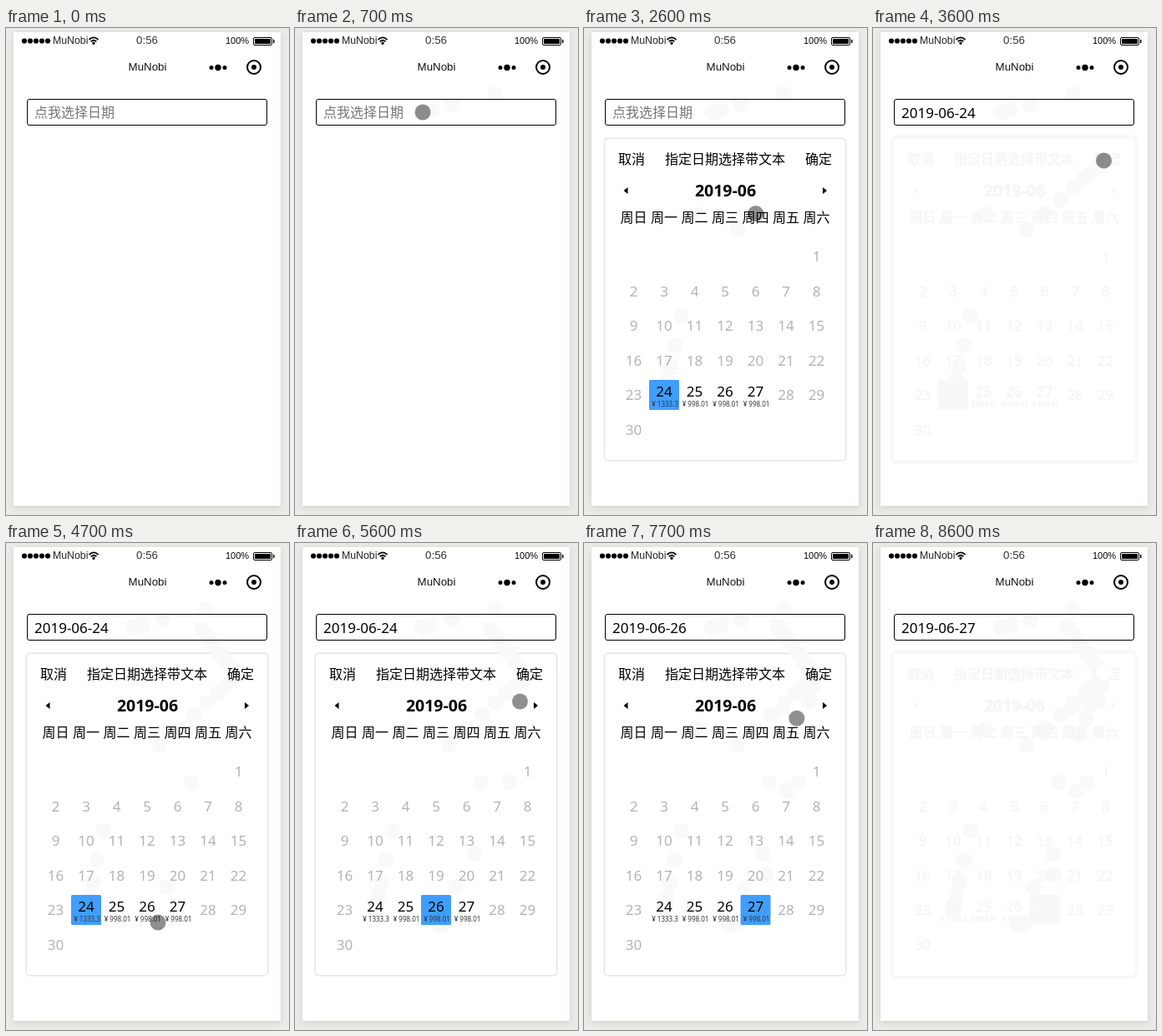
Recreate the animation shown at these times as an HTML page. Size 339 by 584 pixels, loop 9200 ms.

```html
<!DOCTYPE html>
<html lang="zh">
<head>
<meta charset="utf-8">
<title>Date picker</title>
<style>
html, body { margin: 0; width: 100%; height: 100%; overflow: hidden; background: #ecebe7; }
svg { display: block; width: 100vw; height: 100vh; }
text { font: 16px "Noto Sans CJK SC", "Noto Sans CJK", sans-serif; }
.sys { font-family: "Liberation Sans", Arial, sans-serif; }
.num { font-family: "Noto Sans", "Open Sans", sans-serif; font-size: 17px; }
.title { font-size: 19.5px; font-weight: 700; }
.price { font-size: 8px; fill: #333; }
.off { fill: #b3b3b3; }
.mid { text-anchor: middle; }
#frame { fill: #fff; stroke: #e2e2ea; filter: url(#glow); }
#cell { fill: #409eff; }
.faint #frame { stroke: #f8f8f8; stroke-width: 8; paint-order: stroke; filter: none; }
.faint #cell { fill: #f8f8f8; }
.faint text, .faint path { fill: #f6f6f6; stroke: #f6f6f6; stroke-width: .8; }
#trail { fill: #f9f9f9; }
</style>
</head>
<body>
<svg viewBox="0 0 339 584">
  <defs>
    <filter id="soft" x="-10%" y="-10%" width="120%" height="120%">
      <feDropShadow dx="0" dy="2" stdDeviation="4" flood-opacity=".12"/>
    </filter>
    <filter id="glow" x="-10%" y="-10%" width="120%" height="120%">
      <feDropShadow dx="0" dy="0" stdDeviation="1.2" flood-color="#88a" flood-opacity=".25"/>
    </filter>
  </defs>
  <rect width="339" height="584" fill="#ecebe7"/>
  <rect x="9" y="5" width="320" height="568" fill="#fff" filter="url(#soft)"/>

  <g id="dots"></g>
  <text class="sys" x="56" y="19" style="font-size:12.3px" fill="#222">MuNobi</text>
  <g fill="none" stroke="#000" stroke-width="1.8">
    <path d="M99.5 14Q105 8.8 110.5 14M101.7 16.3Q105 13.2 108.3 16.3"/>
    <circle cx="105" cy="18.3" r=".8"/>
  </g>
  <text class="sys mid" x="169" y="19" style="font-size:13.3px" fill="#333">0:56</text>
  <text class="sys" x="263" y="19" style="font-size:11px">100%</text>
  <rect x="296.5" y="11.5" width="22" height="9" rx="1.5" fill="none" stroke="#000"/>
  <rect x="298" y="13" width="19" height="6" rx=".5"/>
  <rect x="320" y="14" width="1.5" height="4"/>

  <text class="sys mid" x="169.5" y="51" style="font-size:13.3px" fill="#111">MuNobi</text>
  <circle cx="246" cy="47.5" r="2.5"/>
  <circle cx="254" cy="47.5" r="3.7"/>
  <circle cx="262" cy="47.5" r="2.5"/>
  <circle cx="297" cy="47" r="8" fill="none" stroke="#000" stroke-width="2"/>
  <circle cx="297" cy="47" r="3"/>

  <g id="panel">
    <rect id="frame" x="24.5" y="132.5" width="289" height="386" rx="4"/>
    <g id="trail"></g>
    <g id="sheet">
      <rect id="cell" y="422" width="36" height="36" rx="1.5"/>
      <text x="41" y="163">取消</text>
      <text x="97" y="163">指定日期选择带文本</text>
      <text x="265" y="163">确定</text>
      <text class="num title mid" x="169.5" y="201.5">2019-06</text>
      <path d="M47.500 195l5-4v8zM291 195l-5-4v8z"/>
    </g>
  </g>

  <rect x="25.5" y="85.5" width="287" height="31" rx="2.5" fill="none" stroke="#000"/>
  <text id="hint" x="34" y="107" fill="#757575">点我选择日期</text>
  <text id="value" class="num" x="34" y="108"></text>
  <rect id="caret" y="91" width="1" height="21"/>
  <circle id="pointer" r="9.5"/>
</svg>
<script>
const LOOP = 9200, STEP = 100, ENTER = 100, LEAVE = 8600, BLINK = 500;
const $ = id => document.getElementById(id);
const show = (el, on) => el.setAttribute("visibility", on ? "visible" : "hidden");

function add(parent, tag, attrs, text) {
  const el = document.createElementNS("http://www.w3.org/2000/svg", tag);
  for (const k in attrs) el.setAttribute(k, attrs[k]);
  if (text !== undefined) el.textContent = text;
  return parent.appendChild(el);
}

// Each round: open the panel, pick a day, confirm it
const rounds = [
  { open: 1000, pick: 2200, save: 3600, day: 24 },
  { open: 4200, pick: 5300, save: 6100, day: 26 },
  { open: 6600, pick: 7500, save: 8400, day: 27 }
];

// Pointer glides; it rests between them. ease is the ease-out power
const glide = (from, to, x, y, ease = 1) => ({ from, to, x, y, ease });
const glides = [
  glide(100, 700, 153, 101, 4),
  glide(1300, 1500, 116.5, 345),
  glide(1500, 2200, 96, 440, 3),
  glide(2400, 2500, 184, 242),
  glide(2500, 3300, 276.5, 159, 2),
  glide(3600, 4200, 235, 104),
  glide(4400, 4500, 222, 287),
  glide(4500, 4700, 182, 455, 2),
  glide(4700, 4900, 173, 458.5),
  glide(5300, 5500, 257, 287),
  glide(5500, 5600, 269.5, 190),
  glide(5600, 5900, 276.5, 157.5, 2),
  glide(6100, 6600, 232, 99.5),
  glide(6700, 6900, 243, 297),
  glide(6900, 7300, 205, 445, 4),
  glide(7500, 7600, 247, 230),
  glide(7600, 8300, 276.5, 155.5, 2)
];

function pointAt(t) {
  let x = 332, y = 55;
  for (const g of glides) {
    if (t <= g.from) break;
    const left = Math.max(0, (g.to - t) / (g.to - g.from));
    const k = 1 - left ** g.ease;
    x += (g.x - x) * k;
    y += (g.y - y) * k;
  }
  return [x, y];
}

const column = i => 59.5 + 36.5 * i;
const slotOf = day => day + 5;

for (let i = 0; i < 5; i++) add($("dots"), "circle", { cx: 22 + 7 * i, cy: 15.5, r: 3.1 });

[..."日一二三四五六"].forEach((d, i) =>
  add($("sheet"), "text", { class: "mid", x: column(i), y: 233 }, "周" + d));

for (let day = 1; day <= 30; day++) {
  const x = column(slotOf(day) % 7), row = Math.floor(slotOf(day) / 7);
  const live = day >= 24 && day <= 27;
  const y = live ? 442 : 280 + 41.6 * row;
  add($("sheet"), "text", { class: "num mid" + (live ? "" : " off"), x, y }, day);
  if (live) add($("sheet"), "text", { class: "num price mid", x: x + 1, y: 454 },
    day === 24 ? "¥ 1333.3" : "¥ 998.01");
}

// Faint marks left along the pointer's way
const marks = [];
for (let t = ENTER + STEP; t < LEAVE; t += STEP) {
  const [cx, cy] = pointAt(t);
  marks.push({ t, el: add($("trail"), "circle", { cx, cy, r: 9.5 }) });
}

function draw(time) {
  const t = Math.floor(time / STEP) * STEP;
  const latest = key => rounds.filter(r => t >= r[key]).pop();
  const opened = latest("open"), picked = latest("pick"), saved = latest("save");
  const open = opened && t < opened.save;

  show($("frame"), opened);
  show($("sheet"), opened);
  $("panel").setAttribute("class", open ? "" : "faint");
  show($("cell"), picked);
  if (picked) $("cell").setAttribute("x", column(slotOf(picked.day) % 7) - 18);
  marks.forEach(m => show(m.el, t > m.t));

  show($("hint"), !saved);
  $("value").textContent = saved ? "2019-06-" + saved.day : "";
  show($("caret"), opened && t < opened.open + BLINK);
  $("caret").setAttribute("x", saved ? 123 : 34);

  const [cx, cy] = pointAt(t), gone = t >= LEAVE, pointer = $("pointer");
  show(pointer, t >= ENTER);
  pointer.setAttribute("cx", cx);
  pointer.setAttribute("cy", cy);
  pointer.setAttribute("fill", gone ? "#fff" : "#000");
  pointer.setAttribute("fill-opacity", gone ? 1 : 0.44);
}

const start = performance.now();
function tick() {
  draw((performance.now() - start) % LOOP);
  requestAnimationFrame(tick);
}
tick();
</script>
</body>
</html>
```
